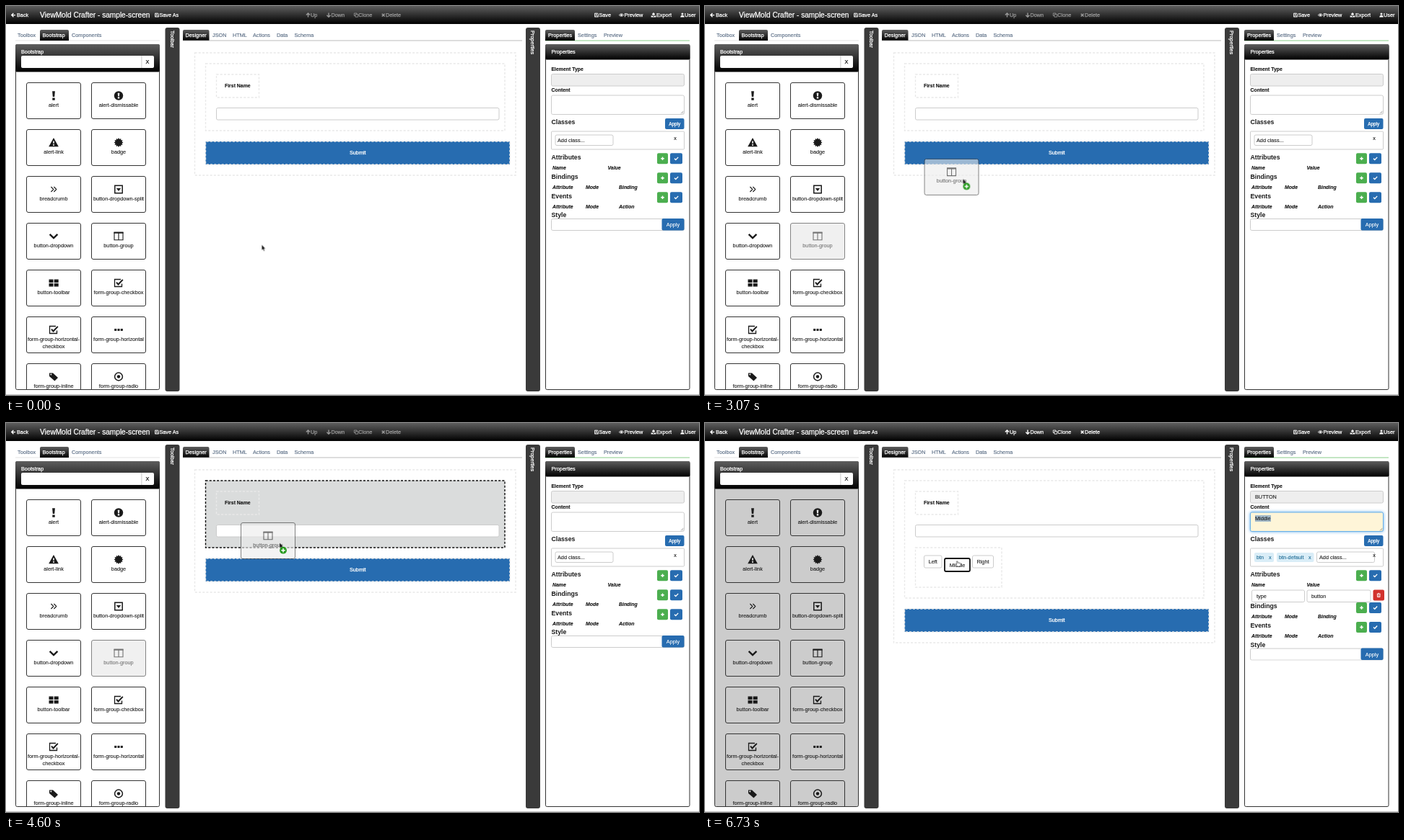
Write an HTML page that moves like this. It is 960 px wide and 540 px high and loops after 7730 ms.

```html
<!DOCTYPE html>
<html lang="en">
<head>
<meta charset="utf-8">
<title>Screen designer</title>
<style>
html, body { margin: 0; width: 100%; height: 100%; overflow: hidden; background: #fff; }
svg { display: block; width: 960px; height: 540px; color: #1a1a1a;
  font: 7.3px "Liberation Sans", Arial, Helvetica, sans-serif; }
text { fill: currentColor; stroke: currentColor; stroke-width: .1px; white-space: pre; }
.med { stroke-width: .25px; }
.bold { font-weight: bold; font-size: 6.9px; color: #111; }
.ital { font-style: italic; }
.head { font-weight: bold; font-size: 8.7px; stroke: none; }
.title { font-size: 10.1px; stroke-width: .25px; }
.small { font-size: 6.4px; }
.white { color: #fff; }
.link { color: #52667f; }
.icon { fill: currentColor; }
.line { fill: none; stroke: currentColor; stroke-width: 1.3px; }
.field { fill: #fff; stroke: #ccc; }
.dash { fill: #fff; stroke: #e9e9e9; stroke-width: 1.4px; stroke-dasharray: 3.1 2.1; }
.submit { fill: #276cb0; stroke: #e9e9e9; }
.box { fill: transparent; stroke: #333; }
.blue { fill: #276cb0; }
.green { fill: #4bae4f; }
.red { fill: #d2322d; }
.tag { fill: #d9edf7; }
.acts { color: #999; }
.tagtext { color: #1d6a94; }
#ghost .box { fill: #ebebeb; }
#ghost { opacity: .6; }
</style>
</head>
<body>
<svg id="stage" viewBox="0 0 960 540" xmlns="http://www.w3.org/2000/svg"></svg>
<script>
const LOOP = 7730;
const svg = document.getElementById('stage');

// ---- drawing helpers ----
const text = (x, y, s, cls = '', mid) =>
  `<text x="${x}" y="${y}" class="${cls}"${mid ? ' text-anchor="middle"' : ''}>${s}</text>`;
const rect = (x, y, w, h, cls, r = 0, extra = '') =>
  `<rect x="${x}" y="${y}" width="${w}" height="${h}" rx="${r}" class="${cls}" ${extra}/>`;
const group = (id, body) => `<g id="${id}">${body}</g>`;
const at = (x, y, body) => `<g transform="translate(${x} ${y})">${body}</g>`;
const solid = d => `<path class="icon" d="${d}"/>`;
const line = (d, w = 1.3) => `<path class="line" style="stroke-width:${w}px" d="${d}"/>`;

const burst = Array.from({ length: 24 }, (_, i) => {
  const a = i * Math.PI / 12, r = i % 2 ? 4.7 : 6.4;
  return (r * Math.sin(a)).toFixed(2) + ' ' + (r * Math.cos(a)).toFixed(2);
}).join('L');
const bang = 'M-1.3-3.8h2.6l-.4 4.6h-1.8zM-1.2 1.8h2.4v2.1h-2.4z';
const icons = {
  alert: solid('M-1.9-6.2h3.8l-.7 7.8h-2.4zM-1.7 3h3.4v3.2h-3.4z'),
  stop: `<circle class="icon" r="6.2"/><path fill="#fff" d="${bang}"/>`,
  warn: solid('M0-6.4L6.8 5.8H-6.8z') + `<path fill="#fff" d="M-.9-2h1.8l-.3 3.6h-1.2zM-.9 2.5h1.8v1.7h-1.8z"/>`,
  badge: solid(`M${burst}z`),
  crumb: line('M-3.6-3.5L-.2 0L-3.6 3.5M.4-3.5L3.8 0L.4 3.5', 1.1),
  split: line('M-5.2-5.2H5.2V5.2H-5.2z', 1.5) + solid('M-3.2-1.6H3.2L0 2.4z'),
  down: line('M-5.4-2.6L0 2.6L5.4-2.6', 2.4),
  cols: line('M-6-5.3H6V5.3H-6zM0-5.3V5.3', 1.1) + solid('M-6.5-5.8h13v2h-13z'),
  blocks: solid('M-6.5-5h6v4.4h-6zM.7-5h6v4.4h-6zM-6.5.6h6V5h-6zM.7.6h6V5h-6z'),
  check: line('M4.5 1V5H-5.5V-5H3') + line('M-3-.8L-.5 2L5.8-4.6', 2),
  dots: solid('M-5.8-1.4h3v3h-3zM-1.5-1.4h3v3h-3zM2.8-1.4h3v3h-3z'),
  tag: solid('M-6-5H-1L6 1.4L1.4 6L-6-.4z') + '<circle cx="-3.7" cy="-2.9" r="1" fill="#fff"/>',
  radio: line('M-5.4 0a5.4 5.4 0 1 0 10.8 0a5.4 5.4 0 1 0-10.8 0', 1.5) + '<circle class="icon" r="2.2"/>',
  plus: line('M-2.3 0H2.3M0-2.3V2.3', 1.5),
  tick: line('M-2.5 0L-.7 1.8L2.7-1.9', 1.4),
  trash: line('M-2.4-1.8H2.4M-1.8-1.6V2.5H1.8V-1.6M-.8-2.6H.8M0-.6V1.8', .9),
  left: line('M3 0H-2M.4-2.6L-2.2 0L.4 2.6', 1.4),
  up: line('M0 3V-2M-2.6-.2L0-2.6L2.6-.2', 1.4),
  low: line('M0-3V2M-2.6 .2L0 2.6L2.6 .2', 1.4),
  copy: line('M-1-1H2.7V2.6H-1zM-1 1H-2.7V-2.6H1V-1', .8),
  cross: line('M-1.9-1.9L1.9 1.9M1.9-1.9L-1.9 1.9', 1.5),
  save: line('M-2.5-2.5H1.6L2.5-1.6V2.5H-2.5zM-1.2 2.5V.5H1.2V2.5M-1.2-2.4V-1H.8V-2.4', .8),
  eye: line('M-3.3 0Q0-3.6 3.3 0Q0 3.2-3.3 0z', .8) + '<circle class="icon" r="1.3"/>',
  load: line('M0 1V-2M-1.8-.7L0-2.6L1.8-.7', 1.3) + solid('M-3.4 .9H-1V2H1V.9H3.4V3H-3.4z'),
  user: solid('M-1.5-1.6a1.5 1.6 0 1 1 3 0a1.5 1.6 0 1 1-3 0M-2.8 2.9Q-2.6 .3-1 .3H1Q2.6 .3 2.8 2.9z')
};

const tile = (icon, label) => rect(0, 0, 75, 50, 'box', 2.5) +
  at(37.5, 18, icons[icon]) +
  label.split('|').map((s, i) => text(37.5, 33 + i * 10, s, '', true)).join('');

const tool = (icon, ix, tx, label) => at(ix, 12.6, icons[icon]) + text(tx, 15.2, label, 'med');
const tab = (x, w, tx, label) =>
  `<path d="M${x} 48V35q0-2 2-2h${w - 4}q2 0 2 2V48z" fill="url(#dark)"/>` + text(tx, 43, label, 'med white');
const rail = (x, label) => rect(x, 30, 20, 505, '', 3, 'fill="#3a3a3a"') +
  `<g transform="translate(${x + 7.3} 34) rotate(90)">${text(0, 0, label, 'med white')}</g>`;
const button = (x, y, w, h, cls, icon) => rect(x, y, w, h, cls, 2) +
  `<g class="white">${at(x + w / 2, y + h / 2, icons[icon])}</g>`;
const section = (y, label, cols) => text(755.5, y, label, 'head') +
  button(902, y - 8.3, 15, 15, 'green', 'plus') + button(920, y - 8.3, 17, 15, 'blue', 'tick') +
  cols.map(([x, s]) => text(x, y + 14, s, 'bold ital')).join('');

// ---- parts ----
const topBar = rect(0, 0, 960, 25, '', 0, 'fill="url(#dark)"') +
  `<g class="white">${tool('left', 10, 15, 'Back')}
  ${text(47, 16, 'ViewMold Crafter - sample-screen', 'title')}
  ${tool('save', 209, 212.4, 'Save As')}${tool('save', 818, 821.4, 'Save')}
  ${tool('eye', 852.5, 856.4, 'Preview')}${tool('load', 897, 901, 'Export')}${tool('user', 937, 940, 'User')}</g>` +
  `<g id="acts" class="acts">${tool('up', 418.5, 422, 'Up')}${tool('low', 447, 450.5, 'Down')}
  ${tool('copy', 485, 488.3, 'Clone')}${tool('cross', 522.7, 526, 'Delete')}</g>`;

const tiles = [
  ['alert', 'alert'], ['stop', 'alert-dismissable'], ['warn', 'alert-link'], ['badge', 'badge'],
  ['crumb', 'breadcrumb'], ['split', 'button-dropdown-split'], ['down', 'button-dropdown'],
  ['cols', 'button-group'], ['blocks', 'button-toolbar'], ['check', 'form-group-checkbox'],
  ['check', 'form-group-horizontal-|checkbox'], ['dots', 'form-group-horizontal'],
  ['tag', 'form-group-inline'], ['radio', 'form-group-radio']
].map(([icon, label], i) =>
  at(i % 2 ? 118.5 : 28.5, 106.5 + 65 * (i >> 1), group('tile' + i, tile(icon, label)))).join('');

const toolbox = text(16, 43, 'Toolbox', 'link') + text(91, 43, 'Components', 'link') +
  rect(13, 47.6, 200, .8, '', 0, 'fill="#ddd"') + tab(47, 40, 50.5, 'Bootstrap') +
  rect(13.5, 53.5, 199, 479, 'field', 2, 'id="panel" style="stroke:#333"') +
  rect(13, 53, 200, 38.5, '', 2, 'fill="url(#dark)"') + text(21, 66.3, 'Bootstrap', 'med white') +
  rect(21, 69, 184, 17, '', 2, 'fill="#fff"') + rect(187.5, 69, .8, 17, '', 0, 'fill="#bbb"') +
  text(196, 80.2, 'X', 'med', true) + `<g clip-path="url(#inside)">${tiles}</g>`;

const choice = (x, y, w, h, label, style = '') => rect(x, y, w, h, 'field', 2, `style="${style}"`) +
  text(x + w / 2, y + h / 2 + 2.5, label, '', true);

const designer = tab(245, 36.5, 248.5, 'Designer') +
  [[286, 'JSON'], [314, 'HTML'], [342, 'Actions'], [375, 'Data'], [399.5, 'Schema']]
    .map(([x, s]) => text(x, 43, s, 'link')).join('') +
  rect(245, 47.6, 470, .8, '', 0, 'fill="#aaa"') +
  rect(261.5, 65, 444.5, 170, 'dash', 0, 'id="root"') +
  rect(276.5, 80, 414.5, 93, 'dash', 0, 'id="form"') +
  rect(291.5, 95, 59, 32, 'dash', 0, 'style="fill:none"') + text(303, 113.4, 'First Name', 'bold') +
  rect(291.5, 141.5, 391.5, 16.5, 'field', 2) +
  rect(291.5, 173, 110.5, 49.5, 'dash', 0, 'id="buttonBox"') +
  group('joined', choice(303.5, 184, 24, 16.5, 'Left') + choice(361.5, 184, 29, 16.5, 'Right') +
    choice(327.5, 184, 34, 16.5, 'Middle')) +
  group('hovered', choice(327.5, 184, 34, 18.5, 'Middle', 'stroke:#111;stroke-width:1.4px;stroke-dasharray:3.1 2.1')) +
  group('apart', choice(303.5, 184, 24.5, 17, 'Left') + choice(370.5, 184, 29, 17, 'Right') +
    choice(332, 188, 35, 18, 'Middle', 'stroke:#111;stroke-width:1.8px')) +
  group('submit', rect(276.5, 188, 421.5, 32, 'dash submit', 1, 'id="submitBox"') +
    text(487.3, 206.3, 'Submit', 'med white', true));

const properties = text(792, 43, 'Settings', 'link') + text(828, 43, 'Preview', 'link') +
  rect(747, 47.6, 200, .9, '', 0, 'fill="#7cc77c"') + tab(747, 41, 751, 'Properties') +
  rect(747.5, 53.5, 199.5, 479, 'field', 2, 'style="stroke:#333"') +
  rect(747, 53, 200.5, 21.5, '', 2, 'fill="url(#dark)"') + text(755.5, 66.4, 'Properties', 'med white') +
  text(755.5, 89.5, 'Element Type', 'bold') + rect(755.5, 94.5, 184, 16.5, 'field', 2, 'style="fill:#eee"') +
  text(755.5, 118.8, 'Content', 'bold') + rect(755.5, 124, 184, 26.5, 'field', 2, 'id="content"') +
  line('M935 149.3L938.4 145.9M937 149.3L938.4 147.9', .4) +
  text(755.5, 164, 'Classes', 'head') + rect(913, 156, 26.5, 15, 'blue', 2) +
  text(926.2, 165.6, 'Apply', 'med small white', true) + rect(755.5, 174, 184, 25, 'field', 1) +
  group('empty', rect(761, 179, 80, 14.5, 'field', 2) + text(764, 188.8, 'Add class...')) +
  section(212.6, 'Attributes', [[757, 'Name'], [833.5, 'Value']]) +
  group('lower', section(239.6, 'Bindings', [[757, 'Attribute'], [803, 'Mode'], [849, 'Binding']]) +
    section(266.6, 'Events', [[757, 'Attribute'], [803, 'Mode'], [849, 'Action']]) +
    text(755.5, 293.2, 'Style', 'head') + rect(755.5, 295.5, 184, 16, 'field', 2) +
    rect(908.5, 295, 31, 16.5, 'blue', 2) + text(924, 306, 'Apply', 'white', true)) +
  group('chosen', text(762, 105.4, 'BUTTON') + rect(762, 128, 22, 9, '', 0, 'fill="#a3b9c9"') +
    text(762, 135, 'Middle') + rect(761, 180, 27, 13, 'tag', 2) + rect(792, 180, 51.5, 13, 'tag', 2) +
    `<g class="tagtext">${text(764, 188.8, 'btn')}${text(781, 188.8, 'x')}
    ${text(795, 188.8, 'btn-default')}${text(836, 188.8, 'x')}</g>` +
    rect(847.5, 179, 80, 14.5, 'field', 2) + text(851, 188.8, 'Add class...') +
    rect(757.5, 232, 73, 16.5, 'field', 2) + text(764, 243, 'type') +
    rect(834, 232, 88, 16.5, 'field', 2) + text(840, 243, 'button') +
    button(925.5, 231.5, 15.5, 15, 'red', 'trash')) +
  text(927, 185.6, 'x', '', true);

const pointer = group('cursor', `<g id="arrow">
  <path d="M0 0V7.8L1.7 6.2L2.9 9L4.2 8.4L3 5.8H5.2z" fill="#111" stroke="#fff" stroke-width=".5"/></g>
  <g id="copying"><circle cx="5" cy="10.7" r="4.9" fill="#2a9b22"/>
  <path d="M2.3 10.7H7.7M5 8V13.4" stroke="#fff" stroke-width="1.5"/></g>
  <g id="hand"><path transform="scale(.85)" d="M-.4 .3q.9-.6 1.3 .3l.6 2.2l4 .8q.8 .3.7 1.2L5.6 9H1L-2.4 5.5q-.2-1 .9-.9l1.2 .8z"
  fill="#fff" stroke="#222" stroke-width=".8"/></g>`);

svg.innerHTML = `<defs>
  <linearGradient id="dark" x2="0" y2="1"><stop stop-color="#5e5e5e"/><stop offset="1" stop-color="#000"/></linearGradient>
  <clipPath id="inside"><rect x="14" y="92" width="198" height="440"/></clipPath></defs>` +
  topBar + toolbox + rail(220.5, 'Toolbar') + designer + rail(720, 'Properties') + properties +
  rect(0, 539, 960, 1, '', 0, 'fill="#c4c4c4"') +
  group('ghost', group('lifted', tile('cols', 'button-group'))) + pointer;

// ---- motion, all times in ms ----
const css = [];
const anim = (id, ease, keys) => {
  const name = 'k' + css.length;
  const body = keys.map(([t, rule]) => `${(t / LOOP * 100).toFixed(3)}%{${rule}}`).join('');
  css.push(`@keyframes ${name}{${body}}#${id}{animation:${name} ${LOOP}ms ${ease} infinite}`);
};
const jump = (id, ...keys) => anim(id, 'step-end', keys);
const show = (id, from, to) => jump(id, [0, `visibility:${from ? 'hidden' : 'visible'}`],
  [from, 'visibility:visible'], ...(to < LOOP ? [[to, 'visibility:hidden']] : []));
const move = (id, pts) => anim(id, 'linear', pts.map(([t, x, y, ease = 'linear']) =>
  [t, `transform:translate(${x}px,${y}px);animation-timing-function:${ease}`]));

const HOT = 'fill:#dadcdc;stroke:#111', COLD = 'fill:#fff;stroke:#e9e9e9';
const DRAG = 2200, DROP = 5000, GROW = 5070, HOVER = 5800, PICK = 6470;
const speedUp = 'cubic-bezier(.3,0,.7,.7)';

move('cursor', [
  [0, 354.3, 331.3], [265, 354.3, 331.3, 'ease-in-out'], [1070, 184, 327, 'ease-out'], [1270, 170, 327],
  [2060, 170, 327], [2130, 176, 326.6, speedUp], [2870, 334.5, 281], [3070, 357.3, 239.8],
  [3130, 360.3, 230], [3470, 360.3, 230], [3530, 364.5, 221], [3600, 369.3, 210, 'ease-out'],
  [4270, 378.3, 169, 'ease-out'], [4600, 379, 166], [5000, 379, 166], [5070, 378, 167], [5465, 378, 167],
  [5530, 375, 168.3, 'ease-in-out'], [5930, 349, 191.5], [LOOP, 349, 191.5]]);
move('ghost', [
  [0, 118.5, 301.5], [2130, 118.5, 301.5, speedUp], [2870, 281, 254.5], [3070, 304, 212.5],
  [3130, 307, 203], [3470, 307, 203], [3530, 311, 195], [3600, 315, 185.5, 'ease-out'],
  [4270, 325, 142, 'ease-out'], [4600, 325.5, 138.5], [LOOP, 325.5, 138.5]]);

show('lifted', DRAG, DROP);
show('copying', DRAG, DROP);
show('arrow', 0, 6070);
show('hand', 6070, LOOP);
show('joined', GROW, PICK);
show('hovered', HOVER, PICK);
show('apart', PICK, LOOP);
show('empty', 0, PICK);
show('chosen', PICK, LOOP);

jump('tile7', [DRAG, 'opacity:.6'], [DROP, 'opacity:1']);
jump('tile7 .box', [930, 'fill:#e6e6e6'], [DROP, 'fill:transparent']);
jump('root', [3130, HOT], [3600, COLD], [3820, HOT], [4080, COLD],
  [GROW, 'height:234px'], [HOVER, 'height:236px'], [PICK, 'height:240px']);
jump('form', [4080, HOT], [DROP, 'fill:#fff'], [GROW, 'height:157.5px'], [5620, 'stroke:#e9e9e9'],
  [HOVER, 'height:159.5px'], [PICK, 'height:163px']);
jump('buttonBox', [0, 'visibility:hidden'], [GROW, 'visibility:visible'], [5620, 'stroke:#111'],
  [HOVER, 'stroke:#e9e9e9;height:51.5px'], [PICK, 'width:119.5px;height:55px']);
jump('submit', [GROW, 'transform:translateY(64.5px)'], [HOVER, 'transform:translateY(66.5px)'],
  [PICK, 'transform:translateY(70px)']);
jump('submitBox', [3600, HOT], [3820, 'fill:#276cb0;stroke:#e9e9e9']);
jump('acts', [PICK, 'color:#fff']);
jump('panel', [PICK, 'fill:#ccc']);
jump('lower', [PICK, 'transform:translateY(17.6px)']);

const plain = 'fill:#fff;stroke:#ccc;filter:drop-shadow(0 0 0 #66afe900)';
const focus = 'fill:#fef5d8;stroke:#66afe9;filter:drop-shadow(0 0 2px #66afe9)';
anim('content', 'linear', [[0, plain], [PICK, plain], [6690, focus], [LOOP, focus]]);

document.head.appendChild(document.createElement('style')).textContent = css.join('\n');
</script>
</body>
</html>
```
